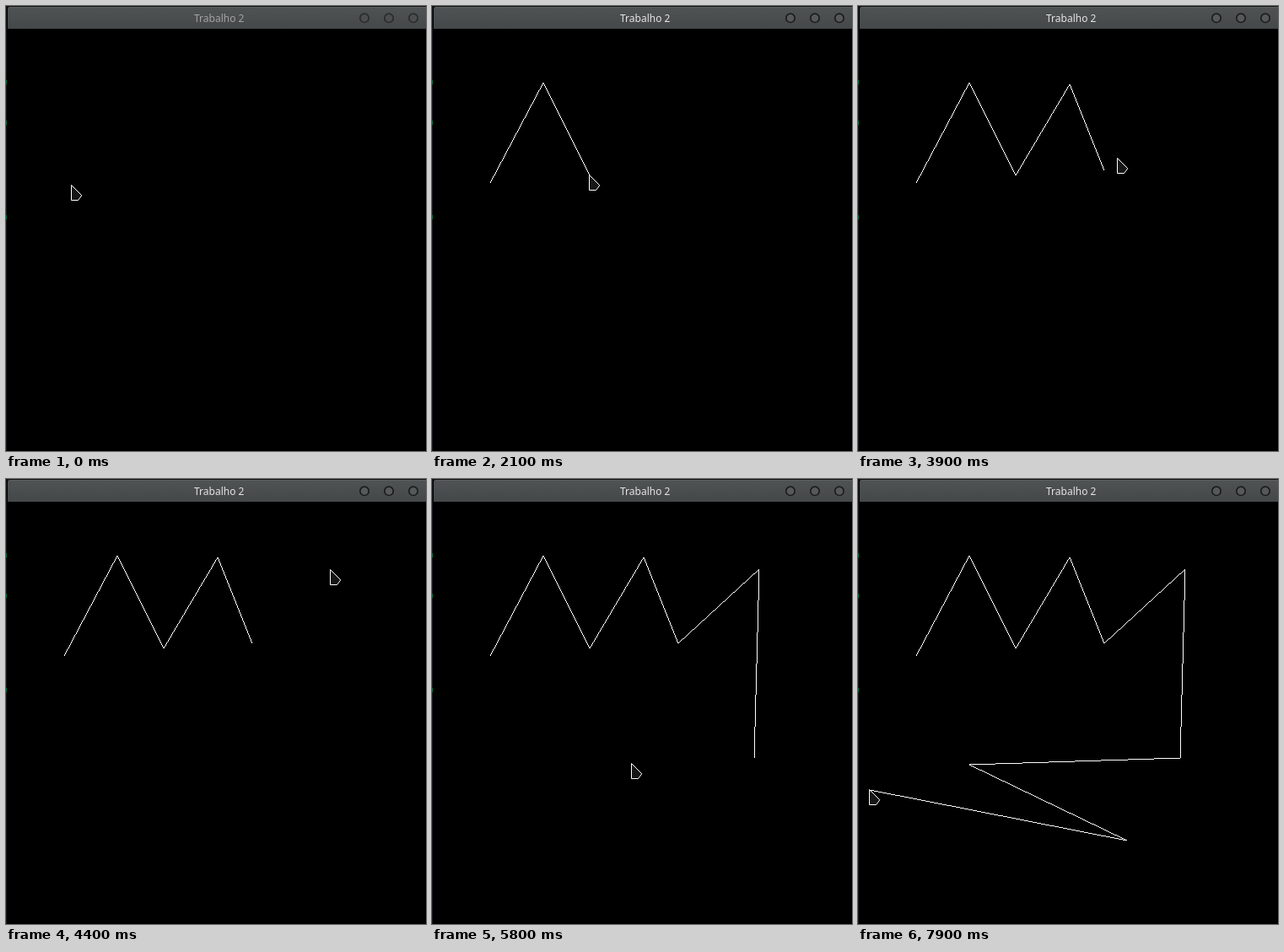
An HTML page with a canvas that plays this animation: 498x528 px, repeating every 8 s.

```html
<!DOCTYPE html>
<html lang="pt">
<head>
<meta charset="utf-8">
<title>Trabalho 2</title>
<style>
  html, body { margin: 0; width: 100%; height: 100%; overflow: hidden; background: #000; }
  canvas { display: block; }
</style>
</head>
<body>
<canvas id="stage" width="498" height="528"></canvas>
<script>
const ctx = document.getElementById('stage').getContext('2d', { alpha: false });
const LOOP = 8000, STEP = 100, FOCUS = 300;

// Where the pointer arrives and when; a click adds a vertex there
const click = (t, x, y) => ({ t, x, y, vertex: true });
const pass = (t, x, y) => ({ t, x, y });
const stops = [
  pass(0, 78, 213),
  click(100, 69, 210),
  click(1200, 132, 91),
  click(2100, 187, 201),
  click(2900, 251, 93),
  pass(3200, 254, 102),
  click(3700, 292, 195),
  pass(4400, 385, 108),
  click(4500, 388, 107),
  click(5400, 382, 331),
  pass(5800, 237, 338),
  click(6200, 132, 339),
  pass(6900, 278, 410),
  click(7200, 319, 429),
  pass(7600, 65, 386),
  click(7900, 14, 369)
];

function rect(x, y, w, h, color) {
  ctx.fillStyle = color;
  ctx.fillRect(x, y, w, h);
}

// Rest for one step at each stop, then go straight to the next in equal steps
function pointerAt(t) {
  const i = stops.findLastIndex(s => s.t <= t);
  const a = stops[i], b = stops[i + 1] || a;
  const steps = Math.max(1, (b.t - a.t) / STEP - 1);
  const k = Math.max(0, Math.floor((t - a.t) / STEP) - 1) / steps;
  return [Math.round(a.x + (b.x - a.x) * k), Math.round(a.y + (b.y - a.y) * k)];
}

// One-pixel line without smoothing, sampled at pixel centres
function drawLine(a, b) {
  const dx = b.x - a.x, dy = b.y - a.y;
  const n = Math.max(Math.abs(dx), Math.abs(dy));
  for (let i = 0.5; i < n; i++) {
    rect(Math.floor(a.x + dx * i / n), Math.floor(a.y + dy * i / n), 1, 1, '#fff');
  }
}

function drawWindow(active) {
  rect(0, 0, 498, 528, '#000');
  rect(0, 0, 1, 528, '#17191e');
  for (const y of [88, 136, 248]) rect(0, y, 1, 5, '#0b6b49');
  rect(0, 0, 498, 1, '#121313');

  const bar = ctx.createLinearGradient(0, 1, 0, 27);
  bar.addColorStop(0, '#505353');
  bar.addColorStop(1, '#454848');
  ctx.fillStyle = bar;
  ctx.beginPath();
  ctx.roundRect(2, 1, 500, 26, [2, 0, 0, 0]);
  ctx.fill();
  rect(4, 1, 494, 1, '#5d6060');

  ctx.font = '12px "Noto Sans", "Open Sans", sans-serif';
  ctx.fillStyle = active ? '#e4e5e5' : '#a2a4a4';
  ctx.fillText('Trabalho 2', 223, 19);

  ctx.lineWidth = 1.7;
  ctx.strokeStyle = active ? '#1b1d1d' : '#2a2c2c';
  ctx.fillStyle = active ? '#565959' : '#4b4e4e';
  for (let x = 425; x < 498; x += 29) {
    ctx.beginPath();
    ctx.arc(x, 14.3, 5.2, 0, 7);
    ctx.fill();
    ctx.stroke();
  }
}

// The outline's tip sits one pixel up and left of the hot spot
function drawPointer(x, y) {
  ctx.beginPath();
  for (const [dx, dy] of [[0, 0], [0, 18], [8, 18], [12.3, 12.3]]) {
    ctx.lineTo(x + dx - 0.5, y + dy - 0.5);
  }
  ctx.closePath();
  ctx.fillStyle = '#161616';
  ctx.fill();
  ctx.lineWidth = 1;
  ctx.strokeStyle = '#fff';
  ctx.stroke();
}

function frame() {
  const t = performance.now() % LOOP;
  drawWindow(t >= FOCUS);
  const vertices = stops.filter(s => s.vertex && s.t <= t);
  vertices.slice(1).forEach((v, i) => drawLine(vertices[i], v));
  drawPointer(...pointerAt(t));
  requestAnimationFrame(frame);
}
frame();
</script>
</body>
</html>
```
